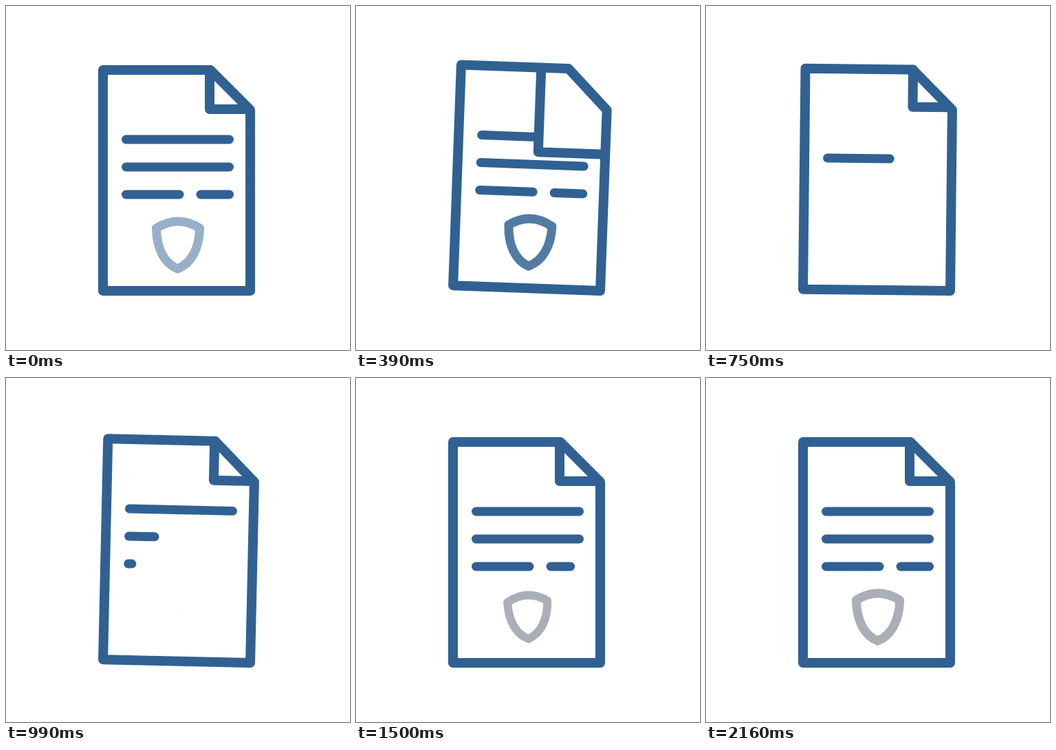
An HTML page that plays this animation: 500x500 px, repeating every 2750 ms.

```html
<!DOCTYPE html>
<html lang="en">
<head>
<meta charset="utf-8">
<title>Document with shield</title>
<style>
  html, body { margin: 0; width: 100%; height: 100%; overflow: hidden; background: #fff; }
  svg { display: block; width: 100vw; height: 100vh; }
  path { fill: none; stroke: #306192; stroke-width: 14; stroke-linecap: round; stroke-linejoin: round; }
  #lines path, #shield { stroke-width: 13; }
  #cover { fill: #fff; stroke: none; }
</style>
</head>
<body>
<svg viewBox="0 0 500 500">
  <g id="page">
    <g id="lines"><path/><path/><path/><path/></g>
    <path id="shield" d="M218.5 323Q250 303 281.5 323C281 353 269 374 249.5 382C230 374 219 353 218.5 323Z"/>
    <path id="cover"/>
    <path id="fold"/>
    <path d="M141 93H297L355 151V414H141Z"/>
  </g>
</svg>
<script>
const LOOP = 2750, STEP = 30, LAST = 2160;
const COVERED = 595;              // the flap hides the whole page here
const POP = 960, PEAK = 1260;     // the shield returns, then is largest
const BLUE = '#306192', GREY = '#aaafb7';
const $ = id => document.getElementById(id);
const page = $('page'), lines = $('lines'), shield = $('shield'), cover = $('cover'), fold = $('fold');

// key points: [time, value]
const TILT = [[0, 0], [240, 6.75], [545, -2.8], [865, 2], [1170, 0]];
const FLAP = [[288, 0], [COVERED, 1], [745, -0.01], [850, 0]];
const FADE = [[0, 0.5], [240, 0.47], [480, 1]];

const LINES = [
  { row: 0, from: 174.5, to: 324.5, start: 478 },
  { row: 1, from: 174.5, to: 324.5, start: 830 },
  { row: 2, from: 174.5, to: 252, start: 910 },
  { row: 2, from: 283, to: 324.5, start: 1200 }
];

const ease = p => (1 - Math.cos(Math.PI * Math.min(1, Math.max(0, p)))) / 2;

// eased value between the key points around t
function at(keys, t) {
  const i = keys.findIndex(([time]) => time > t);
  if (i < 1) return keys.at(i)[1];
  const [t0, v0] = keys[i - 1], [t1, v1] = keys[i];
  return v0 + (v1 - v0) * ease((t - t0) / (t1 - t0));
}

function drawLines(t) {
  const fresh = t >= COVERED;
  const drop = fresh ? 58 * (1 - ease((t - 600) / 300)) : 0;
  LINES.forEach(({ row, from, to, start }, i) => {
    const p = fresh ? ease((t - start) / 480) : 1;
    const d = `M${from} ${194 + 40 * row + drop}H${from + (to - from) * p}`;
    lines.children[i].setAttribute('d', p > 0 ? d : '');
  });
}

function drawShield(t) {
  const fresh = t >= COVERED;
  let scale = 1, spin = 0;
  if (fresh) {
    const u = t - PEAK;
    const swing = Math.exp(-u / 386) * Math.cos(2 * Math.PI * u / 510);
    scale = ease((t - POP) / (PEAK - POP)) * (1 + 0.15 * swing);
    spin = 16.5 * swing ** 3;
  }
  shield.style.display = scale > 0 ? '' : 'none';
  shield.style.stroke = fresh ? GREY : BLUE;
  shield.style.strokeOpacity = fresh ? 1 : at(FADE, t);
  shield.setAttribute('transform',
    `translate(250 346) rotate(${spin}) scale(${scale}) translate(-250 -346)`);
}

function drawFold(t) {
  const p = at(FLAP, t);
  const x = 296 - 155 * p, y = 150 + 264 * p;
  const edge = `M${x} 93V${y}H${Math.min(355, y + 204)}`;
  fold.setAttribute('d', edge);
  cover.setAttribute('d', edge + 'L355 151L297 93Z');
}

function draw(time) {
  const t = Math.min(LAST, Math.floor((time % LOOP) / STEP) * STEP);
  page.setAttribute('transform', `rotate(${at(TILT, t)} 355 414)`);
  drawLines(t);
  drawShield(t);
  drawFold(t);
}

const begin = performance.now();
function tick() {
  draw(performance.now() - begin);
  requestAnimationFrame(tick);
}
tick();
</script>
</body>
</html>
```
